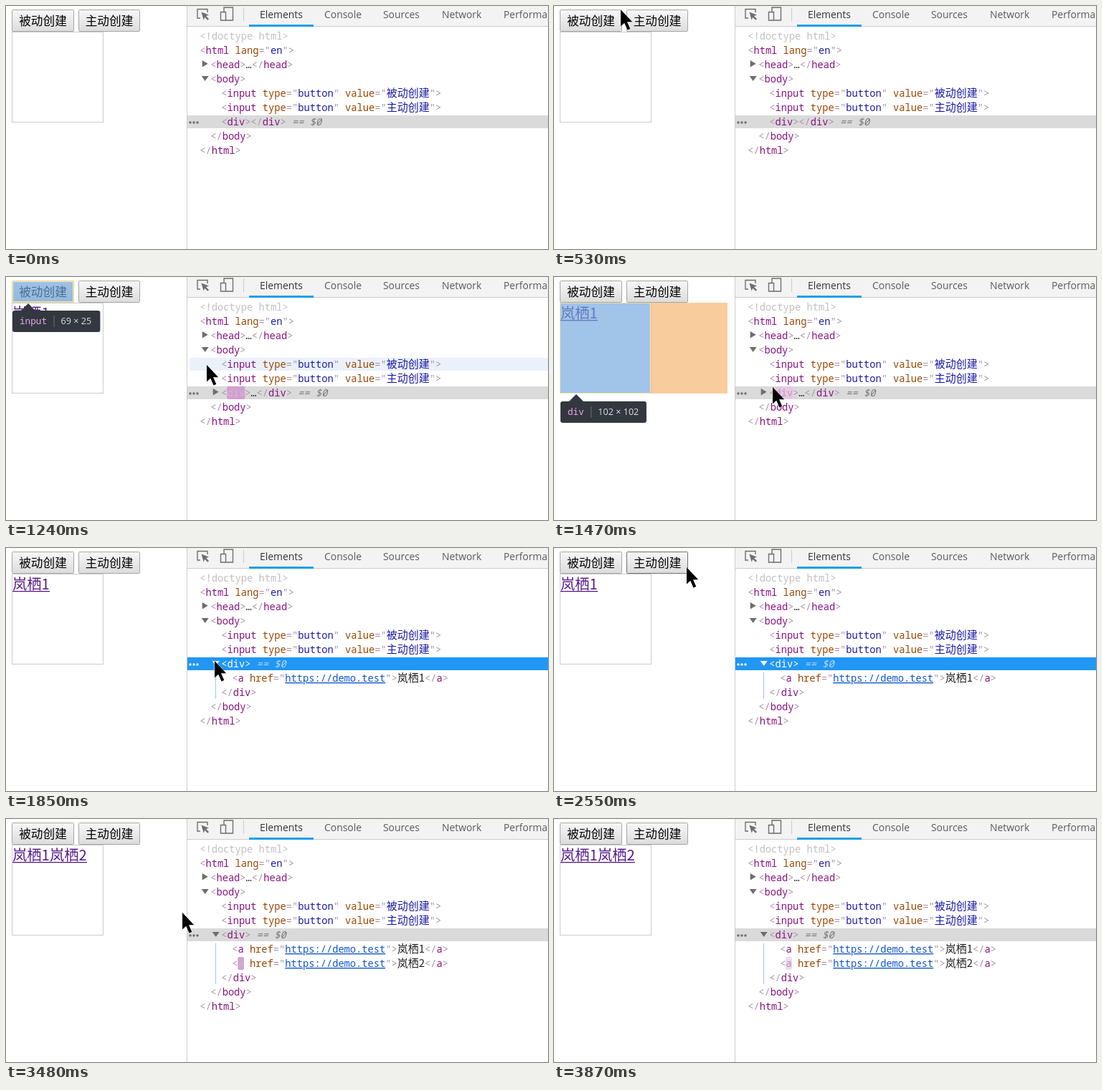
Write an HTML page that moves like this. It is 756 px wide and 340 px high and loops after 4.1 s.

```html
<!DOCTYPE html>
<html lang="zh">
<head>
<meta charset="utf-8">
<style>
html, body { margin: 0; width: 100%; height: 100%; overflow: hidden; background: #fff; }
svg { display: block; }
text { white-space: pre; }
.cjk { font-family: "Noto Sans CJK SC", "Noto Sans CJK", sans-serif; }
.code { font: 13.725px "Noto Sans Mono", monospace; fill: #222; }
.code .cjk { font-size: 15px; }
.bracket { fill: #a894a6; }
.name { fill: #881280; }
.attr { fill: #994500; }
.value { fill: #1a1aa6; }
.link { fill: #15c; text-decoration: underline; }
.doctype { fill: #c0c0c0; }
.ref { fill: #777; font-style: italic; }
.focus tspan { fill: #fff; }
.focus .ref { fill: #b5dcfb; }
.tab { font: 13.9px "Open Sans", sans-serif; fill: #5a5a5a; }
.tip { font: 12.6px "Open Sans", sans-serif; fill: #e0e0e0; }
.tipName { font: 12.7px "Noto Sans Mono", monospace; fill: #e9a9e6; }
</style>
</head>
<body>
<svg id="stage" width="756" height="340" viewBox="0 0 756 340"></svg>
<script>
const LOOP = 4100;
const SITE = '岚栖', URL_TEXT = 'https://demo.test';
const LABELS = ['被动创建', '主动创建'];

// Cursor: time, x, y (hidden when x is missing)
const steps = [
  [0], [70, 300, 104], [150],
  [530, 92, 4], [610, 83, 10], [690, 74, 16], [770, 70, 18], [850, 70, 18], [930, 72, 19], [1010, 148, 36],
  [1080, 223, 62], [1160, 258, 98], [1230, 279, 122], [1310, 292, 138], [1390, 300, 148], [1470, 304, 153],
  [1540, 292, 158], [1620, 290, 157], [1770, 290, 157], [1850, 290, 157],
  [2160, 289, 154], [2240, 279, 139], [2320, 262, 115], [2390, 238, 83], [2470, 208, 47], [2550, 184, 26], [2630, 175, 22],
  [2720, 172, 21], [2790, 171, 20], [2870, 170, 20], [2940, 170, 20], [3010, 170, 20], [3090, 170, 20], [3170, 170, 20], [3240, 170, 20],
  [3330, 195, 55], [3410, 245, 130], [3490, 290, 236], [3560, 320, 318], [3640], [3870]
];

// Clicks: button press, release (adds a link), tree update
const clicks = [[770, 850, 930], [2940, 3010, 3090]];
const EXPAND = 1770, REST = [1850, 2160];

// Box model of each element: left, top, right, bottom, border, size label
const boxes = {
  html: [-2, -5, 252, 173, 0, '203 × 142'],
  body: [8, 5, 242, 163, 0, '187 × 126'],
  div: [8, 36, 135, 163, 1, '102 × 102'],
  input0: [8, 5, 95, 36, 2, '69 × 25'],
  input1: [101, 5, 187, 36, 2, '69 × 25'],
  a0: [9, 37, 61, 63, 0, '42 × 21'],
  a1: [61, 37, 113, 63, 0, '42 × 21']
};
const margins = { body: [0, 0, 252, 173], div: [8, 36, 242, 163] };

const span = (cls, s) => `<tspan class="${cls}">${s}</tspan>`;
const bracket = s => span('bracket', s);
const rect = (x, y, w, h, fill, more = '') =>
  `<rect x="${x}" y="${y}" width="${w}" height="${h}" fill="${fill}" ${more}/>`;
const path = (d, fill, more = '') => `<path d="${d}" fill="${fill}" ${more}/>`;
const text = (x, y, cls, s, more = '') => `<text x="${x}" y="${y}" class="${cls}" ${more}>${s}</text>`;
const boxPath = ([l, t, r, b]) => `M${l} ${t}H${r}V${b}H${l}Z`;
const inset = ([l, t, r, b], d) => [l + d, t + d, r - d, b - d];
const inside = ([l, t, r, b], x, y) => x >= l && x < r && y >= t && y < b;

const attr = (key, value) => ' ' + span('attr', key) + bracket('="') + value + bracket('"');
const open = (name, attrs = '', style = '') =>
  bracket('&lt;') + `<tspan class="name" style="${style}">${name}</tspan>` + attrs + bracket('&gt;');
const close = name => bracket('&lt;/') + span('name', name) + bracket('&gt;');
const cjk = (cls, s) => span('cjk ' + cls, s);

function flashAt(age) {
  const k = 1 - (1 - Math.min(1, Math.max(0, age) / 1120)) ** 3;
  const mix = (a, b) => `rgb(${a.map((v, i) => Math.round(v + (b[i] - v) * k))})`;
  return {
    back: mix([158, 54, 153], [245, 219, 244]),
    ink: 'fill:' + mix([255, 255, 255], [168, 148, 166])
  };
}

// Rows of the element tree; arrow 1 is collapsed, 2 expanded
function treeRows(mode, flash) {
  const ref = span('ref', ' == $0');
  const input = i => ({ level: 2, target: 'input' + i, code:
    open('input', attr('type', span('value', 'button')) + attr('value', cjk('value', LABELS[i]))) });
  const link = (i, lit) => ({ level: 3, target: 'a' + i, lit: lit && 1, code:
    open('a', attr('href', span('link', URL_TEXT)), lit ? flash.ink : '') + cjk('', SITE + (i + 1)) + close('a') });
  const rows = [
    { level: 0, code: span('doctype', '&lt;!doctype html&gt;') },
    { level: 0, target: 'html', code: open('html', attr('lang', span('value', 'en'))) },
    { level: 1, arrow: 1, code: open('head') + '…' + close('head') },
    { level: 1, arrow: 2, target: 'body', code: open('body') },
    input(0), input(1)
  ];
  const div = { level: 2, target: 'div', selected: true };
  if (mode === 0) div.code = open('div') + close('div') + ref;
  else if (mode === 1) Object.assign(div, { arrow: 1, lit: 3, code: open('div', '', flash.ink) + '…' + close('div') + ref });
  else Object.assign(div, { arrow: 2, code: open('div') + ref });
  rows.push(div);
  if (mode > 1) {
    rows.push(link(0));
    if (mode > 2) rows.push(link(1, true));
    rows.push({ level: 2, target: 'div', code: close('div') });
  }
  rows.push({ level: 1, target: 'body', code: close('body') }, { level: 0, target: 'html', code: close('html') });
  return rows;
}

function drawRow(row, i, focused, hovered, flash) {
  const x = 270.2 + row.level * 15, y = 33 + i * 20;
  const white = row.selected && focused, mark = white ? '#fff' : '#6e6e6e';
  let out = '';
  if (row.selected) {
    out += rect(253, y, 503, 18, focused ? '#2196f3' : '#dadada');
    for (const cx of [257, 262, 267]) out += `<circle cx="${cx}" cy="${y + 10}" r="1.7" fill="${mark}"/>`;
  } else if (hovered) out += rect(256, y, 500, 18, 'rgba(56,121,217,.1)');
  if (row.lit) out += rect(x + 8, y, row.lit * 8.235 + .5, 18, flash.back, 'rx="2"');
  if (row.arrow === 1) out += path(`M${x - 11.5} ${y + 3}l8 4.7l-8 4.7z`, mark);
  if (row.arrow === 2) out += path(`M${x - 12.5} ${y + 5}h10l-5 7z`, mark);
  return out + text(x, y + 14, 'code' + (white ? ' focus' : ''), row.code);
}

function drawButton(i, over, pressed) {
  const [l, t, r, b] = boxes['input' + i];
  return rect(l + .5, t + .5, r - l - 1, b - t - 1, pressed ? 'url(#down)' : 'url(#up)',
    `stroke="${over ? '#707070' : '#a6a6a6'}" rx="1"`) +
    text((l + r) / 2, 27, 'cjk', LABELS[i], 'font-size="16.67" text-anchor="middle"');
}

function drawOverlay(target) {
  const box = boxes[target], margin = margins[target], [l, , , b, border, size] = box;
  const inner = inset(box, border);
  let out = '';
  if (margin) out += path(boxPath(margin) + boxPath(box), 'rgba(246,178,107,.66)', 'fill-rule="evenodd"');
  if (border) out += path(boxPath(box) + boxPath(inner), 'rgba(255,229,153,.66)', 'fill-rule="evenodd"');
  out += path(boxPath(inner), 'rgba(111,168,220,.66)');

  const name = target.replace(/\d/, ''), x = Math.max(1, l + 1), y = b + 11;
  const bar = x + 19.5 + name.length * 7.62, width = bar - x + 20 + size.length * 6.4;
  return out + path(`M${x + 12} ${y}l10 -10l10 10z`, '#333740') +
    rect(x, y, width, 30, '#333740', 'rx="3"') +
    text(x + 10, y + 19, 'tipName', name) +
    rect(bar, y + 7, 1, 16, '#6b6f78') + text(bar + 10, y + 19, 'tip', size);
}

function drawToolbar() {
  const tabs = { Elements: 354, Console: 444, Sources: 526, Network: 608, Performance: 694 };
  const line = 'stroke="#6e6e6e" stroke-width="1.4"';
  let out = rect(253, 0, 503, 28, '#f3f3f3') + rect(253, 28, 503, 1, '#ccc') +
    rect(339, 26, 90, 3, '#1a9fe8') + rect(331, 2, 1, 19, '#ccc') +
    path('M271 17H267V4.5H281V9', 'none', line) +
    path('M272.5 8.5l10.5 4l-4 1.6l4 4l-1.7 1.7l-4 -4l-1.7 3.7z', '#6e6e6e') +
    path('M304 8V2H316.5V20H307', 'none', line) +
    path('M299.5 8.5H306.5V20H299.5Z', '#f3f3f3', line);
  for (const name in tabs)
    out += text(tabs[name], 17, 'tab', name, name === 'Elements' ? 'style="fill:#333"' : '');
  return out;
}

const drawCursor = (x, y) => path(`M${x + 1} ${y + 1}v23.5l5.2 -4.8l4.3 9.8l3.8 -1.6l-4.3 -9.7h7.2z`,
  '#000', 'stroke="#fff" stroke-width="1" paint-order="stroke"');

const defs = `<defs>
  <linearGradient id="up" x2="0" y2="1"><stop stop-color="#f7f7f7"/><stop offset="1" stop-color="#dcdcdc"/></linearGradient>
  <linearGradient id="down" x2="0" y2="1"><stop stop-color="#d8d8d8"/><stop offset="1" stop-color="#f0f0f0"/></linearGradient>
  <clipPath id="page"><path d="M0 0H252V340H0Z"/></clipPath></defs>`;

function draw([t, x, y]) {
  const within = (a, b) => t >= a && t < b;
  const updates = clicks.filter(c => t >= c[2]);
  const mode = updates.length + (t >= EXPAND);
  const links = clicks.filter(c => t >= c[1]).length;
  const pressed = clicks.some(c => within(c[0], c[1]));
  const focused = within(EXPAND, clicks[1][0]);
  const flash = flashAt(updates.length ? t - updates.at(-1)[2] + 10 : 0);
  const rows = treeRows(mode, flash);
  const hoverIndex = x > 253 && !within(...REST) ? Math.floor((y - 33) / 20) : -1;
  const target = rows[hoverIndex]?.target;

  let page = rect(8.5, 36.5, 127, 126, 'none', 'stroke="#ccc"');
  LABELS.forEach((_, i) => {
    const over = inside(boxes['input' + i], x, y);
    page += drawButton(i, over, over && pressed);
  });
  for (let i = 0; i < links; i++)
    page += text(9 + i * 52, 58, 'cjk', SITE + (i + 1), 'font-size="20.3" fill="#551a8b"') +
      rect(9 + i * 52, 60, 52, 1.3, '#551a8b');
  if (target) page += drawOverlay(target);

  let tree = '';
  rows.forEach((row, i) => tree += drawRow(row, i, focused, i === hoverIndex, flash));
  if (mode > 1) tree += rect(292, 174, 1, mode === 3 ? 57 : 37, '#a9c0f0');

  stage.innerHTML = defs + `<g clip-path="url(#page)">${page}</g>` + rect(252, 0, 1, 340, '#ccc') +
    drawToolbar() + tree + (x === undefined ? '' : drawCursor(x, y));
}

const stage = document.getElementById('stage');
let shown;
function tick() {
  const t = performance.now() % LOOP;
  const step = steps.findLast(s => s[0] <= t);
  if (step !== shown) draw(shown = step);
  requestAnimationFrame(tick);
}
tick();
</script>
</body>
</html>
```
